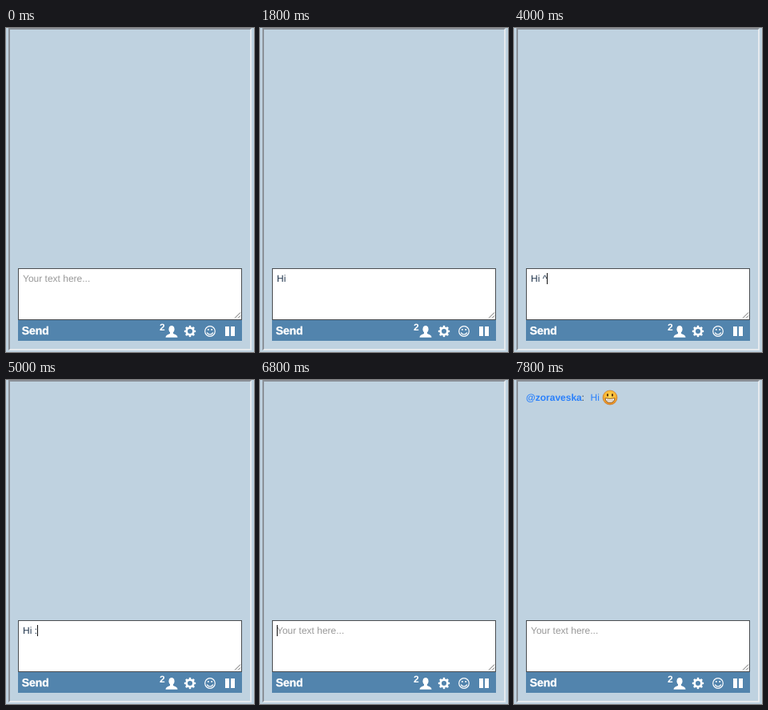
Write an HTML page that moves like this. It is 310 px wide and 406 px high and loops after 8 s.

```html
<!DOCTYPE html>
<html lang="en">
<head>
<meta charset="utf-8">
<title>Chat box</title>
<style>
  html, body { margin: 0; width: 100%; height: 100%; overflow: hidden; background: #bfd2e0; }
  svg { display: block; width: 310px; height: 406px; }
  text { font: 12px "Liberation Sans", Arial, sans-serif; text-rendering: geometricPrecision; white-space: pre; }
  .bold { font-weight: bold; }
  .send { font-size: 14px; stroke: #fff; stroke-width: .35; }
</style>
</head>
<body>
<svg viewBox="0 0 310 406">
  <defs>
    <radialGradient id="face" cx=".5" cy=".4" r=".6">
      <stop offset="0" stop-color="#ffdc55"/>
      <stop offset=".6" stop-color="#fbb935"/>
      <stop offset="1" stop-color="#e2801f"/>
    </radialGradient>
  </defs>
  <rect width="310" height="406" fill="#bfd2e0"/>

  <!-- inset frame -->
  <path d="M307 0V404H3L5 402H305V2Z" fill="#e6eaee"/>
  <path d="M3 404V0H307L305 2H5V402Z" fill="#8b9198"/>

  <g id="message">
    <text class="bold" x="15" y="26" fill="#2a80fb">@zoraveska</text>
    <text x="84.5" y="26" fill="#333c45">:</text>
    <text x="95.5" y="26" fill="#2a80fb">Hi</text>
    <circle cx="120" cy="22" r="9" fill="url(#face)" stroke="#c77a22" stroke-width=".6"/>
    <ellipse cx="117" cy="18.9" rx="1.1" ry="1.8" fill="#5b3410"/>
    <ellipse cx="123" cy="18.9" rx="1.1" ry="1.8" fill="#5b3410"/>
    <path d="M114 22.8Q120 24 126 22.8Q125.3 28.4 120 28.4T114 22.8Z" fill="#fff" stroke="#7a4714" stroke-width=".8"/>
    <path d="M114.8 25.6Q120 26.4 125.2 25.6M117.4 23.5V27.8M120 23.6V28.2M122.6 23.5V27.8" fill="none" stroke="#a98a62" stroke-width=".45"/>
  </g>

  <rect x="15.5" y="301.5" width="279" height="64" fill="#fff" stroke="#4a4d50"/>
  <path d="M286 363.5L293 356.5M290 363.5L293 360.5" stroke="#555" stroke-width=".9"/>
  <text id="entry" x="21" y="318"></text>
  <rect id="caret" y="307" width="1" height="14" fill="#111"/>

  <!-- toolbar -->
  <rect x="15" y="366" width="280" height="26" fill="#5284ad"/>
  <g fill="#fff">
    <text class="bold send" x="19.7" y="384">Send</text>
    <text class="bold" x="192" y="379">2</text>
    <ellipse cx="207" cy="377.6" rx="3.6" ry="4.6"/>
    <path d="M205 380H209V383Q214.5 384.6 214.5 387.8H199.5Q199.5 384.6 205 383Z"/>
    <rect x="274" y="374" width="5" height="12"/>
    <rect x="281" y="374" width="5" height="12"/>
  </g>
  <g fill="none" stroke="#fff">
    <circle cx="230" cy="380" r="4.4" stroke-width="2.7"/>
    <circle cx="230" cy="380" r="6.2" stroke-width="2" pathLength="16" stroke-dasharray="1 1" stroke-dashoffset=".5"/>
    <circle cx="255" cy="380" r="6.3" stroke-width="1.2"/>
    <path d="M251.3 381.5Q252.2 384 255 384T258.7 381.5" stroke-width="1.1"/>
  </g>
  <circle cx="252.8" cy="378" r="1" fill="#fff"/>
  <circle cx="257.2" cy="378" r="1" fill="#fff"/>
</svg>
<script>
  const LOOP = 8000, SENT = 7000;
  const [message, entry, caret] = ["message", "entry", "caret"].map(id => document.getElementById(id));

  // time, typed text, caret x (0 = hidden)
  const steps = [
    [0, "", 0], [600, "", 21], [800, "H", 30], [1000, "Hi", 33],
    [1400, "Hi ", 35], [1800, "Hi ", 0], [2400, "Hi ", 35], [2800, "Hi ", 0],
    [3400, "Hi ", 35], [3800, "Hi ", 0], [4000, "Hi ^", 41], [4600, "Hi ", 35],
    [5000, "Hi :", 39], [5400, "Hi :", 0], [5800, "Hi :-", 43], [6200, "Hi :-)", 47],
    [6800, "", 21], [7400, "", 0]
  ];

  function draw(t) {
    const [, typed, x] = steps.filter(s => s[0] <= t).pop();
    entry.textContent = typed || "Your text here...";
    entry.setAttribute("fill", typed ? "#24384f" : "#999");
    caret.setAttribute("x", x);
    caret.setAttribute("visibility", x ? "visible" : "hidden");
    message.setAttribute("visibility", t >= SENT ? "visible" : "hidden");
  }

  const start = performance.now();
  function tick() {
    draw((performance.now() - start) % LOOP);
    requestAnimationFrame(tick);
  }
  tick();
</script>
</body>
</html>
```
